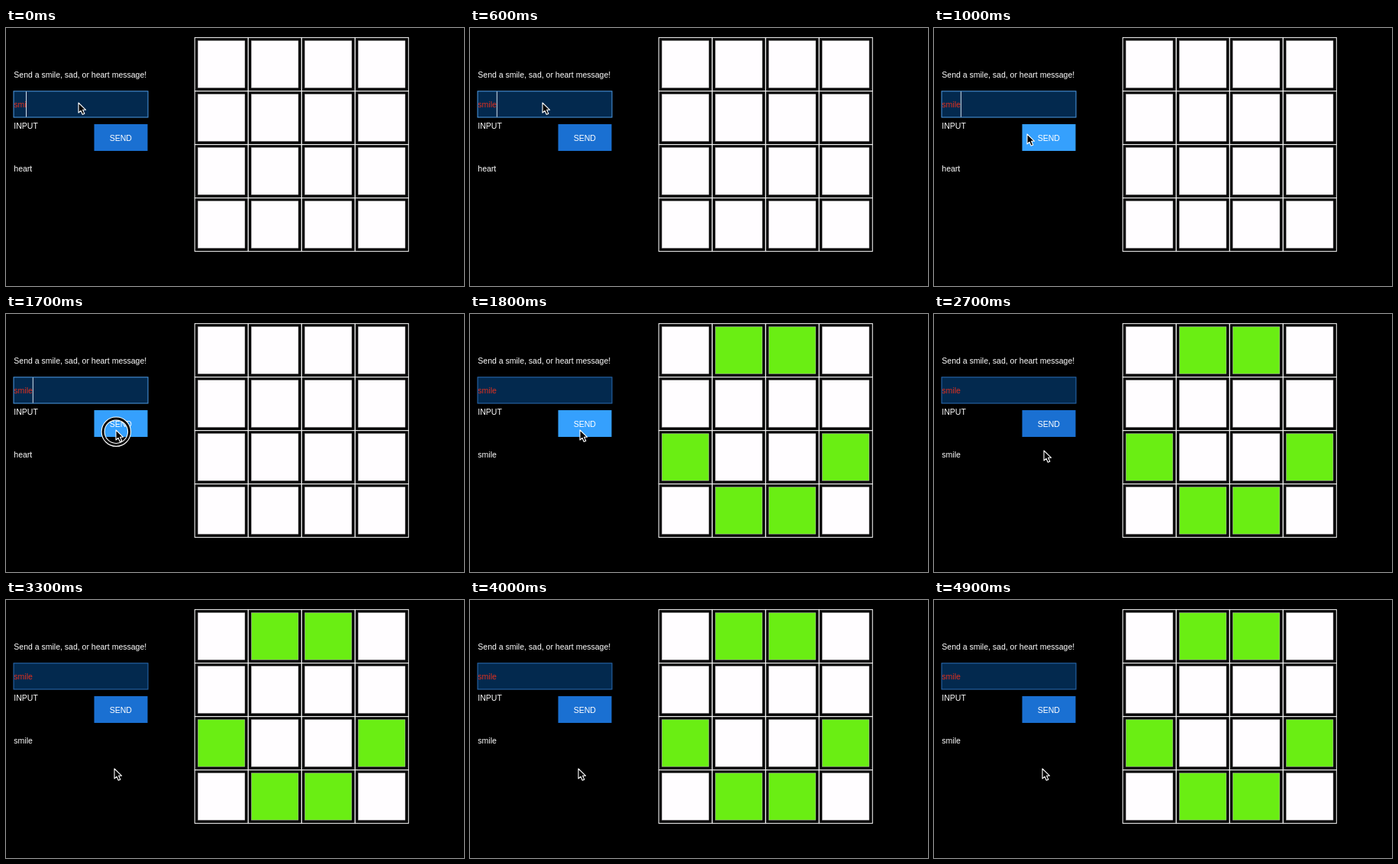
An HTML page that plays this animation: 600x338 px, repeating every 5000 ms.

```html
<!DOCTYPE html>
<html lang="en">
<head>
<meta charset="utf-8">
<title>Message grid</title>
<style>
  html, body { margin: 0; width: 100%; height: 100%; overflow: hidden; background: #000; }
  svg { display: block; width: 100vw; height: 100vh; }
  text { font: 10.5px "Liberation Sans", Arial, sans-serif; fill: #fff; }
  #typed { fill: #e2301f; }
  .line { fill: none; stroke: #e8e8e8; stroke-width: 1.1; }
</style>
</head>
<body>
<svg viewBox="0 0 600 338">
  <text x="10.3" y="65">Send a smile, sad, or heart message!</text>
  <rect id="field" x="10" y="82.8" width="176" height="34.2" fill="#03294e"/>
  <text id="typed" x="10.3" y="104"></text>
  <path id="caret" d="M0 83.2V116.6" stroke="#d5e2ef" stroke-width="1"/>
  <text x="10.3" y="131.5">INPUT</text>
  <rect id="button" x="115.5" y="126" width="70" height="35"/>
  <text x="150.3" y="148" text-anchor="middle">SEND</text>
  <text id="message" x="10.3" y="187.5"></text>
  <g id="grid"></g>
  <g id="ring" fill="none" transform="translate(144.3 154.2)">
    <circle r="17.2" stroke="#fff" stroke-width="5"/>
    <circle r="17.2" stroke="#000" stroke-width="2.8"/>
  </g>
  <path id="pointer" d="M0 0V13L3 10.3L5.2 15.3L7.8 14.2L5.6 9.3H9.6Z"
        fill="#000" stroke="#fff" stroke-width="1.1" stroke-linejoin="round"/>
</svg>
<script>
const LOOP = 5000, STEP = 100;
const SENT = 1800;
const el = id => document.getElementById(id);

// [time, value]: each value holds until the next entry
const typing = [[0, "smi"], [300, "smil"], [600, "smile"]];
const caretOn = [[0, true], [1100, false], [1600, true], [SENT, false]];
const ringOn = [[0, false], [1600, true], [SENT, false]];
const hover = [[0, false], [1000, true], [2600, false]];
const caretX = { smi: 26.5, smil: 29.2, smile: 35.3 };

// [time, x, y] of the pointer tip
const path = [
  [0, 95, 98], [700, 95, 98], [800, 99, 106], [1000, 122, 139],
  [1200, 144, 152], [2400, 144, 152], [2600, 144, 163], [2700, 144, 179],
  [2850, 143, 209], [3000, 142, 221], [LOOP, 142, 221]
];

const smile = new Set([1, 2, 8, 11, 13, 14]);
const cells = [];

function add(attrs) {
  const node = document.createElementNS("http://www.w3.org/2000/svg", "rect");
  for (const key in attrs) node.setAttribute(key, attrs[key]);
  return el("grid").appendChild(node);
}

for (let i = 0; i < 16; i++) {
  const x = 247.3 + 70 * (i % 4), y = 12.6 + 70 * Math.floor(i / 4);
  add({ class: "line", x, y, width: 70, height: 70 });
  cells.push(add({ x: x + 4.2, y: y + 4.2, width: 61.4, height: 61.4,
                   stroke: "#c9c5c9", "stroke-width": 0.5 }));
}

const held = (table, t) => table.filter(row => row[0] <= t).pop()[1];

function pointerAt(t) {
  const i = path.findIndex(p => p[0] > t);
  const [t0, x0, y0] = path[i - 1], [t1, x1, y1] = path[i];
  const k = (t - t0) / (t1 - t0);
  return [x0 + (x1 - x0) * k, y0 + (y1 - y0) * k];
}

const show = (id, on) => el(id).setAttribute("visibility", on ? "visible" : "hidden");

function draw(t) {
  const sent = t >= SENT, word = held(typing, t);
  el("typed").textContent = word;
  el("message").textContent = sent ? "smile" : "heart";
  el("field").setAttribute("stroke", sent ? "#2b6cb4" : "#4d9be6");
  el("button").setAttribute("fill", held(hover, t) ? "#35a0fd" : "#1a70d2");
  el("caret").setAttribute("transform", `translate(${caretX[word]} 0)`);
  show("caret", held(caretOn, t));
  show("ring", held(ringOn, t));
  el("pointer").setAttribute("transform", `translate(${pointerAt(t)})`);
  cells.forEach((cell, i) =>
    cell.setAttribute("fill", sent && smile.has(i) ? "#6aee13" : "#fffdff"));
}

const start = performance.now();
function tick() {
  const t = Math.max(0, performance.now() - start) % LOOP;
  draw(Math.floor(t / STEP) * STEP);
  requestAnimationFrame(tick);
}
tick();
</script>
</body>
</html>
```
